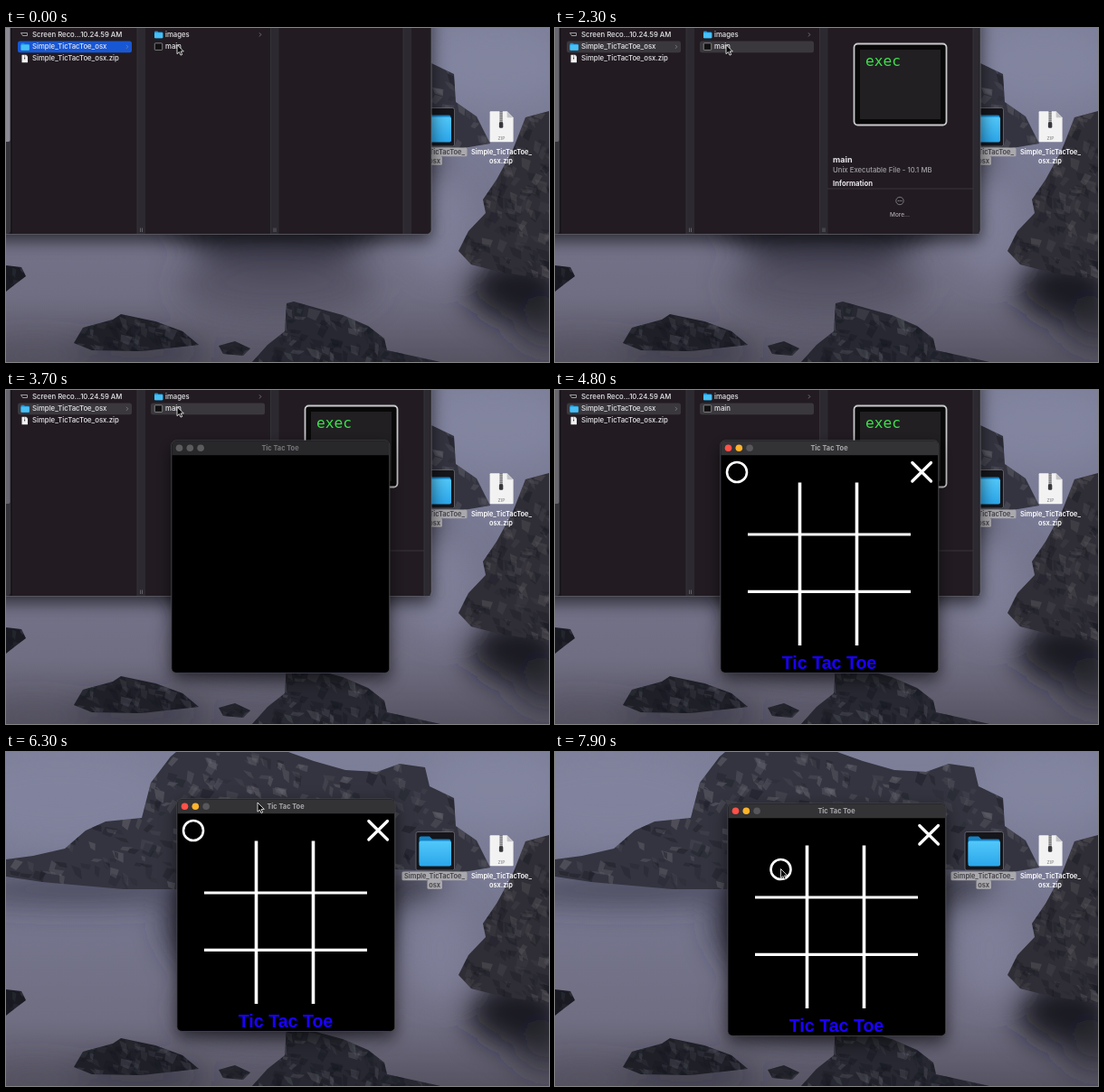
An HTML page that plays this animation: 600 px wide and 370 px high, repeating every 8000 ms.

```html
<!DOCTYPE html>
<html lang="en">
<head>
<meta charset="utf-8">
<title>Tic Tac Toe</title>
<style>
html, body { margin: 0; width: 100%; height: 100%; overflow: hidden; background: #5d5b6c; }
svg { position: absolute; left: 0; top: 0; width: 600px; height: 370px; }
#scenery { will-change: transform; }
text { font-family: Inter, "Open Sans", sans-serif; font-size: 7.75px; font-weight: 500; fill: #e8e7ea; }
.bold { font-weight: 700; }
.mid { text-anchor: middle; }
.label { font-size: 7.4px; font-weight: 600; fill: #fff; }
.picked { fill: #424147; }
.mono { font: 16.2px "DejaVu Sans Mono", monospace; fill: #3fe04d; }
.board { font: bold 19.6px "Liberation Sans", Arial, sans-serif; fill: #1c00ff; }
</style>
</head>
<body>
<svg id="scenery" viewBox="0 0 600 370">
  <defs>
    <linearGradient id="water" x2="0" y2="1">
      <stop offset="0" stop-color="#7d7f99"/>
      <stop offset=".35" stop-color="#7a7b95"/>
      <stop offset=".55" stop-color="#74748c"/>
      <stop offset=".8" stop-color="#706e82"/>
      <stop offset="1" stop-color="#565463"/>
    </linearGradient>
    <filter id="mist" x="-50%" y="-50%" width="200%" height="200%"><feGaussianBlur stdDeviation="16"/></filter>
    <filter id="soft"><feGaussianBlur stdDeviation=".6"/></filter>
  </defs>
  <rect width="600" height="370" fill="url(#water)"/>
  <g id="haze" filter="url(#mist)"></g>
  <g id="rocks" filter="url(#soft)"></g>
</svg>

<svg id="stage" viewBox="0 0 600 370">
  <defs>
    <filter id="shadow" x="-20%" y="-20%" width="140%" height="145%">
      <feDropShadow dx="0" dy="7" stdDeviation="9" flood-opacity=".6"/>
    </filter>
    <linearGradient id="folderFill" x2="0" y2="1">
      <stop offset="0" stop-color="#52c8fa"/><stop offset="1" stop-color="#2ba6ea"/>
    </linearGradient>
    <g id="miniFolder">
      <path d="M0 1.2q0-1 1-1h2.4l1 1h3.9q1 0 1 1v4.9q0 1-1 1H1q-1 0-1-1z" fill="#1d93d6"/>
      <rect y="2" width="9.3" height="6.1" rx=".8" fill="#46c0f6"/>
    </g>
    <g id="zip">
      <path d="M1 0h18l7 7v26q0 1-1 1H1q-1 0-1-1V1q0-1 1-1z" fill="#f2f2f2"/>
      <path d="M19 0v6q0 1 1 1h6z" fill="#c4c4c6"/>
      <path d="M12.5 0v14" stroke="#55555a" stroke-width="3.4" stroke-dasharray="1.3 .7"/>
      <rect x="10.3" y="12" width="4.4" height="6.5" rx="1.4" fill="#38383c"/>
    </g>
  </defs>

  <g id="icons">
    <rect x="453" y="88.5" width="42.5" height="42.5" rx="2" fill="#15151a" stroke="#6d6c75" stroke-width=".8"/>
    <path d="M456.5 95.5q0-2 2-2h9.5l3 3h18.5q2 0 2 2v24h-35z" fill="#1583c6"/>
    <rect x="456.5" y="98.5" width="35.5" height="28" rx="2" fill="url(#folderFill)"/>
    <rect x="437.5" y="132.5" width="72" height="9.8" rx="1.5" fill="#a9a8ac"/>
    <rect x="465.5" y="142" width="16.5" height="9.8" rx="1.5" fill="#a9a8ac"/>
    <text class="label picked mid" x="473.5" y="140">Simple_TicTacToe_</text>
    <text class="label picked mid" x="473.7" y="149.5">osx</text>
    <use href="#zip" x="534.6" y="92.3"/>
    <text class="mid" x="547.5" y="124" style="font-size:5px;fill:#8a8a8e">ZIP</text>
    <text class="label mid" x="547.5" y="140">Simple_TicTacToe_</text>
    <text class="label mid" x="547" y="149.5">osx.zip</text>
  </g>

  <g id="finder">
    <rect x="-300" y="-36" width="770" height="264.5" rx="5" fill="#201e23" stroke="#5f5e66" stroke-width=".8" filter="url(#shadow)"/>
    <rect x="-299" y="-35" width="304" height="263" rx="4" fill="#36343b"/>
    <rect id="scroller" x="-3" y="-20" width="7.5" height="146" rx="2"/>
    <path d="M6 -20V228" stroke="#111014"/>
    <g id="gutters"></g>

    <rect id="folderRow" x="13" y="14.5" width="126" height="12.8" rx="2.5"/>
    <rect id="mainRow" x="160" y="14.5" width="126" height="12.8" rx="2.5" fill="#3a383d"/>
    <path d="M16.5 5.5h7v3h-5z" fill="none" stroke="#bbb" stroke-width=".8"/>
    <text x="29" y="9.8">Screen Reco...10.24.59 AM</text>
    <use href="#miniFolder" x="16.5" y="16.6"/>
    <text x="29" y="23.2">Simple_TicTacToe_osx</text>
    <use href="#zip" transform="translate(17.5 29.8) scale(.25)"/>
    <text x="29" y="36.4">Simple_TicTacToe_osx.zip</text>
    <use href="#miniFolder" x="164" y="3.2"/>
    <text x="176" y="9.8">images</text>
    <rect x="164.3" y="16.8" width="8.4" height="7.6" rx=".8" fill="#111" stroke="#a5a5a8" stroke-width=".7"/>
    <text x="176" y="23.2">main</text>
    <path d="M133 18.8l1.8 2-1.8 2M280 5.4l1.8 2-1.8 2" fill="none" stroke="#85838a" stroke-width=".8"/>

    <g id="preview">
      <rect x="330.5" y="17.5" width="102" height="90" rx="4" fill="#080808" stroke="#c9c9cc" stroke-width="1.8"/>
      <rect x="337" y="24" width="89" height="77" fill="#211f22"/>
      <text class="mono" x="343" y="41.5">exec</text>
      <text class="bold" x="307" y="148.8" style="font-size:9px">main</text>
      <text x="307" y="160" style="fill:#a19fa5">Unix Executable File - 10.1 MB</text>
      <text class="bold" x="307" y="174.5">Information</text>
      <path d="M301 178H462" stroke="#3d3b40" stroke-width=".8"/>
      <circle cx="381" cy="191.5" r="4.2" fill="none" stroke="#9a989e" stroke-width=".7"/>
      <path d="M378.8 191.5h4.6" stroke="#9a989e" stroke-width="1" stroke-dasharray="1 .8"/>
      <text class="mid" x="381" y="208.5" style="font-size:6.5px;fill:#aaa8ae">More...</text>
    </g>
  </g>

  <g id="game">
    <rect x="182.9" y="56" width="240.8" height="257.4" rx="5" fill="#000" stroke="#47474b" stroke-width=".9" filter="url(#shadow)"/>
    <path id="titleBar" d="M183.4 72.3V61q0-4.5 4.5-4.5h230.8q4.5 0 4.5 4.5v11.3z"/>
    <g id="lights"></g>
    <text id="title" class="bold mid" x="303" y="66.8" style="font-size:7.4px">Tic Tac Toe</text>
    <g id="content">
      <path d="M270.5 102.5V283M333.5 102.5V283" stroke="#fff" stroke-width="3.6"/>
      <path d="M213 160H393M213 223.3H393" stroke="#fff" stroke-width="3.2"/>
      <path d="M394.8 80.5L415.5 101M415.5 80.5L394.8 101" stroke="#fff" stroke-width="3.2" stroke-linecap="round"/>
      <circle id="nought" cx="201" cy="91" r="11" fill="none" stroke="#fff" stroke-width="2.6"/>
      <text class="board mid" x="303" y="309.3">Tic Tac Toe</text>
    </g>
  </g>

  <path id="cursor" d="M0 0V10.2L2.4 8L4 11.6L5.7 10.9L4.1 7.4H7.3Z" fill="#050505" stroke="#fff" stroke-width=".8"/>
</svg>

<script>
const LOOP = 8000;
const $ = id => document.getElementById(id);
const set = (id, attrs) => { for (const k in attrs) $(id).setAttribute(k, attrs[k]); };
const show = (id, on) => set(id, { visibility: on ? "visible" : "hidden" });

let seed = 11;
const random = () => (seed = seed * 16807 % 2147483647) / 2147483647;
const between = (a, b) => a + random() * (b - a);

function haze(cx, cy, rx, ry, color, opacity) {
  $("haze").innerHTML += `<ellipse cx="${cx}" cy="${cy}" rx="${rx}" ry="${ry}" fill="${color}" opacity="${opacity}"/>`;
}

// A dark outline filled with small seeded facets, lighter toward the top.
function rock(outline, color, light, count) {
  const id = "rock" + $("rocks").children.length;
  const holder = document.createElementNS("http://www.w3.org/2000/svg", "g");
  holder.innerHTML = `<clipPath id="${id}"><path d="${outline}"/></clipPath><path d="${outline}" fill="${color}"/>`;
  $("rocks").append(holder);
  const box = holder.lastChild.getBBox();
  let facets = "";
  for (let i = 0; i < count; i++) {
    const x = box.x + random() * box.width, depth = random(), y = box.y + depth * box.height;
    const w = between(4, 14), h = between(3, 13), lean = between(-8, 4);
    const lit = random() > .2 + depth * .6;
    facets += `<path d="M${x} ${y}l${w} ${h * .3}l${lean} ${h}l${-w * .7} ${-h * .4}z"
      fill="${lit ? light : "#14151e"}" opacity="${between(.1, .4)}"/>`;
  }
  holder.innerHTML += `<g clip-path="url(#${id})">${facets}</g>`;
}

haze(60, 50, 120, 50, "#8385a0", .7);
haze(540, 40, 80, 45, "#8587a2", .8);
haze(80, 152, 150, 15, "#3a3a4b", .85);
haze(300, 190, 125, 80, "#2e2d3b", .9);
haze(300, 285, 110, 35, "#4d4b5a", .7);
haze(435, 150, 50, 22, "#2f2f3d", .8);
haze(480, 220, 38, 55, "#83849f", .7);
haze(565, 288, 55, 38, "#14141d", .95);
haze(600, 325, 40, 30, "#22212b", .7);
haze(145, 358, 80, 12, "#2d2c38", .8);
haze(30, 362, 50, 14, "#4f4d5c", .6);

rock("M0 119L30 115L65 107L88 87L110 77L150 73L160 34L182 5L188 0H312L340 10L375 20L410 22L435 13L463 17L468 38L495 51L497 82L520 98L535 128L505 133L430 130L410 152H180L130 152L40 144L0 138Z", "#33343f", "#75747d", 420);
rock("M600 92L574 99L560 135L542 168L527 190L530 205L511 225L500 247L514 262L545 270L600 279Z", "#2f2e36", "#625e64", 190);
rock("M0 263L17 265L22 275L10 284L0 292Z", "#191a22", "#4b4c57", 14);
rock("M75 349L85 332L118 323L127 317L165 325L195 336L213 351L150 358L95 357Z", "#1e1f27", "#555660", 90);
rock("M235 352L253 347L270 355L262 363L240 361Z", "#22232b", "#4b4c57", 14);
rock("M272 370L289 351L308 336L310 305L318 303L350 312L372 318L400 330L418 344L421 357L480 370Z", "#272831", "#63646e", 160);

function gutters(lastX, lastWidth) {
  const strip = (x, w) => `<rect x="${x}" y="-20" width="${w}" height="248" fill="#2c2a30"/>
    <path d="M${x} -20V228" stroke="#3c3a40" stroke-width=".7"/>`;
  const grip = x => `<path d="M${x} 221.5v4.5m2 0v-4.5" stroke="#77757c" stroke-width=".7"/>`;
  return strip(145, 9) + strip(292.5, 9) + strip(lastX, lastWidth) + grip(148.5) + grip(296);
}
const lights = colors => colors.map((c, i) =>
  `<circle cx="${191.5 + 11.8 * i}" cy="64.3" r="3.8" fill="${c}"/>`).join("");

const clamp = v => Math.max(0, Math.min(1, v));
const ease = v => v * v * (3 - 2 * v);
const progress = (t, from, to) => ease(clamp((t - from) / (to - from)));

// Each stop is [time, x, y].
function along(stops, t) {
  let [, x, y] = stops[0];
  for (let i = 1; i < stops.length; i++) {
    const p = progress(t, stops[i - 1][0], stops[i][0]);
    x += (stops[i][1] - stops[i - 1][1]) * p;
    y += (stops[i][2] - stops[i - 1][2]) * p;
  }
  return [x, y];
}
const pointerStops = [
  [0, 189, 18.5], [3900, 189, 18.5], [4400, 60, -15], [5320, 60, -15], [5600, 272, 60],
  [5700, 272, 60], [6300, 278, 56], [6800, 280, 61], [6900, 280, 61], [7300, 209, 92],
  [7400, 209, 92], [7880, 249.5, 129.5]
];
const windowStops = [[5700, 0, 0], [6300, 6, -4], [6800, 8, 1]];

let lastState = "";
function drawState(selected, active) {
  const state = `${selected}${active}`;
  if (state === lastState) return;
  lastState = state;
  set("folderRow", { fill: selected ? "#3a383d" : "#1857d4" });
  set("scroller", { fill: selected ? "#68666e" : "#8d8b93" });
  $("gutters").innerHTML = selected ? gutters(462, 6.5) : gutters(439, 9);
  $("lights").innerHTML = lights(active ? ["#ff5148", "#ffb32b", "#57575b"] : ["#5b5b5e", "#5b5b5e", "#5b5b5e"]);
  set("titleBar", { fill: active ? "#333235" : "#28272a" });
  $("title").style.fill = active ? "#aaa9ad" : "#77767a";
  show("content", active);
}

function render(t) {
  const selected = t >= 100, finderOpen = t < 5420;
  drawState(selected, t >= 3900);

  // The file window shrinks back into its folder.
  const scale = 1 - .835 * progress(t, 4980, 5300) - .12 * progress(t, 5300, 5420);
  set("finder", {
    transform: `translate(473.5 110) scale(${scale}) translate(-473.5 -110)`,
    opacity: 1 - progress(t, 5300, 5420)
  });
  show("finder", finderOpen);
  show("mainRow", selected && finderOpen);
  show("preview", selected && finderOpen);

  const [dx, dy] = along(windowStops, t);
  const open = .85 + .15 * progress(t, 2860, 3000);
  set("game", {
    transform: `translate(${dx + 303} ${dy + 185}) scale(${open}) translate(-303 -185)`,
    opacity: progress(t, 2840, 2960)
  });

  const [x, y] = along(pointerStops, t);
  set("cursor", { transform: `translate(${x} ${y})` });
  const held = t >= 7400;
  set("nought", { cx: held ? x - dx : 201, cy: held ? y - dy + .5 : 91 });
}

function tick() {
  render(performance.now() % LOOP);
  requestAnimationFrame(tick);
}
tick();
</script>
</body>
</html>
```
